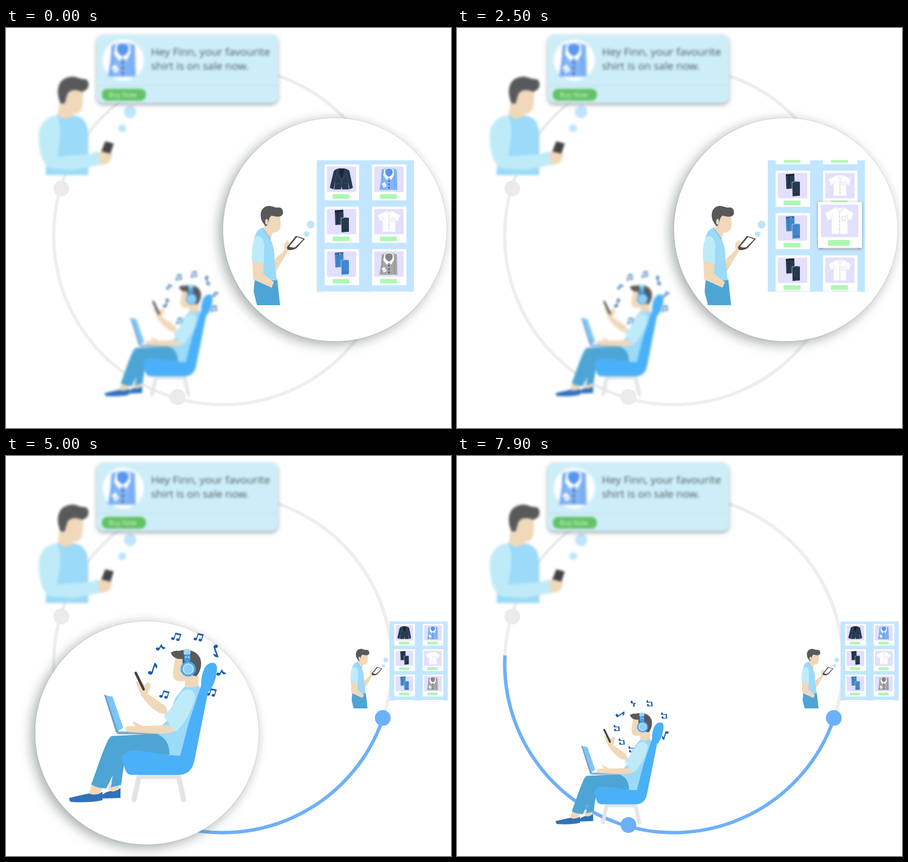
Write an HTML page with a canvas that moves like this. It is 789 by 710 pixels and loops after 8000 ms.

```html
<!DOCTYPE html>
<html lang="en">
<head>
<meta charset="utf-8">
<title>Shopping journey</title>
<style>
html, body { margin: 0; width: 100%; height: 100%; overflow: hidden; background: #fff; }
canvas { display: block; }
</style>
</head>
<body>
<canvas id="stage" width="789" height="710"></canvas>
<script>
const W = 789, H = 710, LOOP = 8000;
const stage = document.getElementById('stage').getContext('2d');
const layer = Object.assign(document.createElement('canvas'), { width: W, height: H }).getContext('2d');
let g = stage;

const SKIN = '#f0d8ba', HAIR = '#58595b', SHIRT = '#9bdaf8', SLEEVE = '#bfebf9',
      PANTS = '#4da5d5', NAVY = '#27394d', CHAIR = '#4ab0f8', NOTE = '#1d5fa6',
      GREY = '#eeeeee', BLUE = '#6db0fb';
const RING = { x: 384.5, y: 368.5, r: 300 };

function fill(color, d) { g.fillStyle = color; g.fill(new Path2D(d)); }

function line(color, width, d) {
  g.strokeStyle = color;
  g.lineWidth = width;
  g.stroke(new Path2D(d));
}

function disc(color, x, y, r, ry = r) {
  g.fillStyle = color;
  g.beginPath();
  g.ellipse(x, y, r, ry, 0, 0, Math.PI * 2);
  g.fill();
}

function box(color, x, y, w, h, r = 0) {
  g.fillStyle = color;
  g.beginPath();
  g.roundRect(x, y, w, h, r);
  g.fill();
}

function at(x, y, scale, draw, turn = 0) {
  g.save();
  g.translate(x, y);
  g.rotate(turn * Math.PI / 180);
  g.scale(scale, scale);
  draw();
  g.restore();
}

function shadow(color, blur, dx, dy) {
  g.shadowColor = color;
  g.shadowBlur = blur;
  g.shadowOffsetX = dx;
  g.shadowOffsetY = dy;
}

function blurred(amount, draw) {
  layer.clearRect(0, 0, W, H);
  g = layer;
  draw();
  g = stage;
  g.save();
  g.filter = `blur(${amount}px)`;
  g.drawImage(layer.canvas, 0, 0);
  g.restore();
}

// Products, drawn around their own centre
function blazer() {
  fill(NAVY, 'M-6-19L6-19Q13-17 14-14L20 15L14 18L11 1L13 18L1 18L0 12L-1 18L-13 18L-11 1L-14 18L-21 15L-14-14Q-13-17-6-19Z');
  fill('#172433', 'M-5-19H5L0-1Z');
  line('#4d6075', .8, 'M-6-18L-9-10L0 2L9-10L6-18M0 2V12M-11 1L-10-7M11 1L10-7M-9 8H-4M4 8H9');
}

function foldedShirt(main, dark) {
  fill(main, 'M-13-17L-5-20H6L14-17L15 19H-17L-14 0Z');
  line(dark, .8, 'M-11-14L-13 18M10-12V18M0 0V19');
  fill('#fff', 'M-8-18Q0-22 8-18L9-8L4 1L0-3L-4 1L-10-7Z');
  fill(dark, 'M-6-17Q0-21 6-17Q8-11 4-7L0-4L-4-7Q-8-11-6-17Z');
  for (const y of [3, 9, 15]) disc('#4c596d', 0, y, 1.3);
  fill('#fff', 'M-13 8L-8 5L-4 12L-9 15Z');
  line(dark, .8, 'M-10 10L-7 12');
}

function trousers(main, trim) {
  fill(main, 'M-12-20L3-21L4 5L-11 6Z');
  fill(trim, 'M-12-20L3-21V-18L-12-17Z');
  line(trim, .8, 'M-6-18L-7 4M-10-14L-6-11');
  fill(main, 'M-1-6Q6-9 13-7V18L0 19Z');
  line('#d9def2', .8, 'M-1 19V-6Q6-9 13-7');
  line(trim, .9, 'M1 15L13 14');
}

function whiteShirt() {
  fill('#fff', 'M-8-17L-4-19Q0-16 4-19L9-17L19-11L16-1L11-3V18H-11V-3L-16-1L-20-11Z');
  line('#d9d9e2', .8, 'M-4-18L0-11L5-18M0-11V18M-11-3L-10-9M11-3L10-9M3-6H8V-1H3Z');
  for (const y of [-6, 0, 6, 12]) disc('#c9c9d4', 0, y, .8);
}

const blueShirt = () => foldedShirt('#82b5f5', '#5795ee');
const greyShirt = () => foldedShirt('#a7a7a9', '#858587');
const darkTrousers = () => trousers(NAVY, '#15222f');
const jeans = () => {
  trousers('#4187cc', '#2c67a5');
  disc('#dba94b', -3, -18, 1.3);
};
const SHELF = [[blazer, blueShirt], [darkTrousers, whiteShirt], [jeans, greyShirt], [darkTrousers, whiteShirt]];

function card(product) {
  box('#fff', 0, 0, 61, 64);
  g.shadowColor = 'transparent';
  box('#e2dfff', 4, 4, 52, 45, 2);
  box('#adf8b0', 14, 53, 30, 8);
  at(30, 26.5, 1, product);
}

function catalogue(scroll, picked) {
  g.save();
  g.beginPath();
  g.rect(551, 234.5, 172.5, 234);
  g.clip();
  box('#c2e6ff', 551, 234.5, 172.5, 234);
  SHELF.forEach((row, i) => row.forEach((product, j) =>
    at(565 + j * 84, 242 + i * 75.2 - scroll, 1, () => card(product))));
  g.restore();
  if (picked) at(640, 308.5, 1.28, () => {
    shadow('rgba(0,0,0,.45)', 5, 0, 1.5);
    card(whiteShirt);
  });
}

function shopper() {
  fill(PANTS, 'M441 446H481L486 492H445L439 468Z');
  fill(SKIN, 'M474 413L494 394L493 383L500 376L502 382L500 388L511 391L500 396L478 433Z');
  fill(SKIN, 'M460 338L470 333L486 332L487 350Q486 363 473 363L469 376L453 362L459 350Z');
  fill(SHIRT, 'M448 358L455 354L469 375C476 389 476 400 476 412L480 448H440L437 410L440 375Q443 361 448 358Z');
  line('#7fc8ec', 2, 'M455 355L469 375');
  fill(SKIN, 'M437 412L457 417L456 436L475 451L471 461L438 446Z');
  fill(SLEEVE, 'M444 370C452 368 458 376 458 388L457 419L436 413L436 395C437 383 439 373 444 370Z');
  fill(HAIR, 'M460 352L454 343C449 331 452 318 464 316C470 315 474 318 480 319C488 317 492 322 491 330C488 337 479 335 471 333C466 336 466 343 463 350Z');
  disc(SKIN, 462, 344, 2.5, 5);
  fill('#4a4a4c', 'M498 389L514 369L530 374L515 391Q506 396 499 393Z');
  fill('#fff', 'M502 388L516 371L527 375L513 389Q507 391 502 388Z');
  disc('#bfe4fb', 533, 366, 5);
  disc('#bfe4fb', 540, 349, 7);
}

function shop(scroll, picked) {
  shopper();
  catalogue(scroll, picked);
}

// Music notes circle the listener's head
const GLYPHS = 'DSHDDSHDD';
const FROM = [131, 180, 220, 252, 290, 328, 366, 404, 448];
const TO = [177, 211, 251, 288, 333, 380, 427, 474, 503];

function glyph(type) {
  if (type === 'D') {
    disc(NOTE, -5, 5, 3, 2.4);
    disc(NOTE, 4, 4, 3, 2.4);
    line(NOTE, 1.7, 'M-3 5V-6M6 4V-7');
    line(NOTE, 3, 'M-3.8-5L6.8-6');
  } else if (type === 'S') {
    disc(NOTE, -2, 8, 4, 3);
    line(NOTE, 2.6, 'M1 8V-11');
    fill(NOTE, 'M0-12L4-10Q8-7 6-2Q4-6 1-6Z');
  } else {
    disc(NOTE, -4, 4.5, 3.4, 2.6);
    line(NOTE, 2, 'M-2 5L0-5');
    fill(NOTE, 'M-1-6Q2-1 9-2L6 2Q1 1-1-2Z');
  }
}

function notes(k) {
  FROM.forEach((from, i) => {
    const a = (from + (TO[i] - from) * k) * Math.PI / 180, type = GLYPHS[i];
    const tilt = (i === 5 ? 160 : 18) + k * (type === 'S' ? 36 : 70);
    at(321 + 61 * Math.cos(a), 378 + 60 * Math.sin(a), 1, () => glyph(type), tilt);
  });
}

function listener(k) {
  notes(k);
  g.lineCap = g.lineJoin = 'round';
  line('#e3e5e5', 9, 'M227 610L236 569H306L315 610');
  // feet and legs
  fill(SKIN, 'M153 580L171 588L166 602L146 602ZM181 584L202 580L199 594L184 600Z');
  fill('#2f72ba', 'M168 603Q180 594 186 595Q194 597 203 589V607L170 608Z');
  fill('#2f72ba', 'M112 607Q128 603 147 599Q160 604 171 596V611Q150 616 115 614Q112 612 112 607Z');
  fill(SHIRT, 'M316 410L341 406L348 420L332 470L312 534L288 533L262 493L285 470L300 430Z');
  fill(PANTS, 'M187 497L265 493C281 497 290 510 290 530H245L212 536C208 552 207 566 204 584L186 588L189 567L178 590Q162 590 151 583C160 560 168 532 180 506Q183 500 187 497Z');
  // chair
  fill(CHAIR, 'M359 369C369 364 375 369 374 379C373 395 367 411 358 420L334 541C330 559 320 566 305 566H223Q214 566 211 556L206 538C206 528 214 523 230 523C258 525 280 531 309 532L325 470L346 407C346 391 350 374 359 369Z');
  // raised arm with the phone
  fill(SKIN, 'M230 401L238 398L246 407L251 401Q258 403 256 410L251 422L283 444L289 460L272 456C256 447 242 432 235 414Z');
  line('#403f43', 4.5, 'M230 385L244 414');
  // laptop
  fill('#6d9cc0', 'M174 424L177 424L200 490H195Z');
  fill('#7cc4fb', 'M177 425L189 427L208 483L198 488Z');
  fill('#82add0', 'M194 489H272V494H198Z');
  // head
  fill(SKIN, 'M300 358L296 385Q296 400 308 400L318 399L317 409Q328 414 341 407V385L316 373L313 356Z');
  fill(HAIR, 'M292 349Q299 344 306 346C328 340 346 350 346 368C346 378 342 387 337 391L318 386Q312 374 313 360Q297 362 292 349Z');
  box('#9bd6fa', 315, 343, 12, 10, 3);
  box('#3f9fe8', 316, 352, 11, 13, 4);
  line('#3f9fe8', 2, 'M321 361V368');
  disc('#dff3ff', 319, 357, 1.3);
  disc('#dff3ff', 324, 357, 1.3);
  disc('#48a9f1', 323, 378, 13.5);
  disc('#c3e7fd', 323, 378, 10);
  disc('#8ccdf8', 323, 378, 8);
  // near arm
  fill(SKIN, 'M292 478L242 479L226 471Q222 473 230 479L214 480Q207 486 218 490L270 493Q292 493 304 487Z');
  fill(SLEEVE, 'M314 417C323 411 336 416 335 428C331 450 318 472 303 488Q296 487 291 478L279 461C290 456 302 430 314 417Z');
  g.lineCap = 'butt';
  g.lineJoin = 'miter';
}

const smallListener = k => at(93.2, 205, .73, () => listener(k));
const smallShop = () => at(680 - 551 * .6, 293.5 - 234.5 * .6, .6, () => shop(0, false));

function messenger() {
  fill(SKIN, 'M106 120L112 108L137 108L136 134C135 149 127 153 119 152L118 164L91 160L95 130Z');
  fill(SHIRT, 'M92 154Q104 168 120 155C138 158 145 168 146 190V261H70L74 200Z');
  fill(SKIN, 'M161 224L172 216L188 222Q188 234 181 240L167 244Z');
  fill(SLEEVE, 'M92 155C105 170 93 205 91 228L146 224L163 219L167 243L120 252L78 249C61 240 58 212 58 190C59 170 72 155 92 155Z');
  fill(SHIRT, 'M92 154Q104 168 120 155L128 180L95 195Q98 170 90 155Z');
  fill(HAIR, 'M97 134C88 115 90 91 112 87C124 84 128 91 142 91C150 97 147 112 134 113C122 108 111 110 108 120L104 134Z');
  fill('#434346', 'M176 201L191 205L185 223L169 219Z');
  disc('#c0e4fb', 206, 178, 7);
  disc('#c0e4fb', 220, 149, 11);
}

function bubble() {
  g.save();
  shadow('rgba(70,90,100,.55)', 7, 0, 3);
  box('#cdeef8', 161, 12, 321, 121, 12);
  g.restore();
  box('#bcdfe9', 163, 101.5, 317, 1.5);
  disc('#fff', 208, 57, 36.5);
  at(207, 57, 1.55, blueShirt);
  g.fillStyle = '#4c5a60';
  g.font = '19px "Open Sans", "Noto Sans", sans-serif';
  g.fillText('Hey Finn, your favourite', 257, 49);
  g.fillText('shirt is on sale now.', 257, 74);
  box('#63c263', 170, 108, 78, 21, 9);
  g.fillStyle = '#e4f7e4';
  g.font = '12px "Open Sans", "Noto Sans", sans-serif';
  g.fillText('Buy Now', 182, 123);
}

function spotlight(x, y) {
  disc('rgba(60,70,65,.012)', x - 4, y + 4, 214);
  disc('rgba(60,70,65,.014)', x - 1, y + 1, 207);
  g.save();
  shadow('rgba(95,112,102,.5)', 20, -7, 6);
  disc('#fff', x, y, 198);
  g.restore();
  g.save();
  shadow('rgba(0,0,0,.18)', 3, 0, 0);
  disc('#fff', x, y, 198);
  g.restore();
}

function arc(color, from, to) {
  g.strokeStyle = color;
  g.lineWidth = 6;
  g.beginPath();
  g.arc(RING.x, RING.y, RING.r, from * Math.PI / 180, to * Math.PI / 180);
  g.stroke();
}

// Number of 100 ms steps taken since start, at most max
const steps = (t, start, max) => t < start ? 0 : Math.min(max, 1 + Math.floor((t - start) / 100));

function poseAt(t) {
  let end = 0;
  if (t >= 3500) end = 29.3 + steps(t, 4000, 6) * 76.4 / 6;
  if (t >= 7100) end = 115 + steps(t, 7600, 4) * 67.8 / 4;
  return {
    scroll: 16 * Math.min(4, Math.floor(t / 500)),
    picked: t >= 2500,
    browsing: t < 3500,
    end,
    second: t >= 4500,
    listening: t >= 5000 && t < 7100,
    waiting: t < 5000,
    turn: t < 5000 ? -.3 : [5500, 5700, 5900, 6100].filter(s => t >= s).length / 4
  };
}

function render(p) {
  g = stage;
  g.fillStyle = '#fff';
  g.fillRect(0, 0, W, H);
  arc(GREY, 0, 360);
  disc('#ebebeb', 98, 285, 14);
  if (p.end) arc(BLUE, 18.8, p.end);
  disc(p.second ? BLUE : '#ebebeb', 304, 655, 14);
  if (!p.browsing) disc(BLUE, 668, 465, 14);
  blurred(2.2, () => { messenger(); bubble(); });
  if (p.waiting) blurred(2, () => smallListener(p.turn));
  if (p.browsing) {
    spotlight(583, 358);
    shop(p.scroll, p.picked);
  } else {
    smallShop();
  }
  if (p.listening) {
    spotlight(250, 491.5);
    listener(p.turn);
  } else if (!p.waiting) {
    smallListener(p.turn);
  }
}

const began = performance.now();
let shown = '';
function tick() {
  const pose = poseAt((performance.now() - began) % LOOP);
  const key = JSON.stringify(pose);
  if (key !== shown) {
    shown = key;
    render(pose);
  }
  requestAnimationFrame(tick);
}
tick();
</script>
</body>
</html>
```
